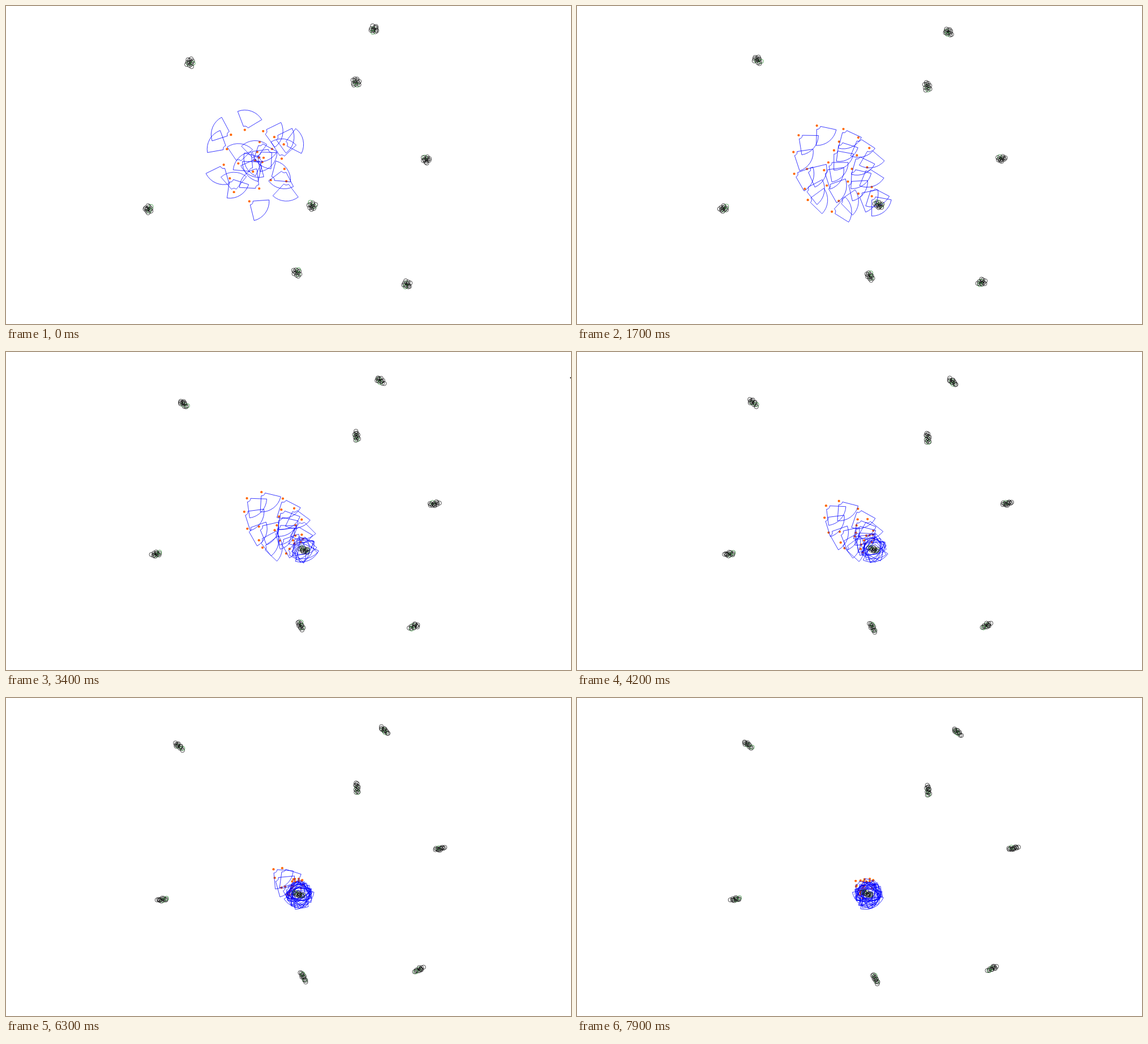
Recreate the animation shown at these times as an HTML page. Size 998 px wide and 561 px high, loop 8000 ms.

```html
<!DOCTYPE html>
<html lang="en">
<head>
<meta charset="utf-8">
<title>Foraging swarm</title>
<style>
  html, body { margin: 0; width: 100%; height: 100%; overflow: hidden; background: #fff; }
  svg { display: block; width: 998px; height: 561px; }
  .view { fill: none; stroke: #00f; stroke-width: .7; }
  .agent { fill: #f60; }
  .cell { fill: none; stroke: #000; stroke-width: .7; }
  .sprout { stroke: #17801f; }
</style>
</head>
<body>
<svg id="stage" viewBox="0 0 998 561" xmlns="http://www.w3.org/2000/svg"></svg>
<script>
const STEP = 100, STEPS = 80;
const FOUND = 8, TURN = 10, GATHER = 17;
const VIEW = { near: 6.5, far: 35, half: 40 };
const CELLS = 13, GOLDEN = 137.5;
const NEST = [448, 268];

// x, y, heading of each agent at the moment food is found
const flock = [
  [412,200,-101], [381,214,172], [370,247,180], [364,284,84], [390,283,-114], [422,283,-124],
  [428,258,86], [436,238,12], [448,219,39], [457,200,-16], [486,214,-16], [509,234,-43],
  [487,240,103], [508,270,-113], [476,267,124], [464,293,112], [511,296,73], [511,323,63],
  [477,326,-65], [427,311,-165], [378,316,28], [390,345,-121], [447,343,-167], [425,365,6]];

// x, y, drift direction of each food cluster
const food = [
  [325,100,-143], [650,41,41], [618,134,86], [742,271,-12],
  [541,353,-165], [251,358,-6], [514,470,63], [708,491,-29]];
const goal = food[4];

const RAD = Math.PI / 180;
const lerp = (a, b, k) => a + (b - a) * k;
const clamp = k => Math.min(1, Math.max(0, k));
const polar = (r, deg) => [r * Math.cos(deg * RAD), r * Math.sin(deg * RAD)];
const bearing = ([x0, y0], [x1, y1]) => Math.atan2(y1 - y0, x1 - x0) / RAD;
const move = ([x, y], r, deg) => [x + r * Math.cos(deg * RAD), y + r * Math.sin(deg * RAD)];
const turn = (a, b, k) => a + ((((b - a) % 360) + 540) % 360 - 180) * k;
const noise = n => { const v = Math.sin(n * 127.1 + 11.7) * 43758.5453; return v - Math.floor(v); };

function center([x, y, direction], t) {
  const p = t / (STEPS - 1);
  return move([x, y], 29 * p * (1.3 - .3 * p), direction);
}

// Spread out from the nest, then turn to the food, slow down and stop around it.
function journey([x, y, heading], i) {
  const standoff = 18 + 12 * noise(i);
  const found = [x, y], outward = bearing(NEST, found);
  const poses = [];
  let pos = found;
  for (let t = 0; t < STEPS; t++) {
    if (t <= FOUND) {
      const left = 1 - t / FOUND;
      poses.push({ pos: move(found, -21 * left, outward), angle: heading + 30 * left });
      continue;
    }
    const target = center(goal, t);
    if (t <= TURN) pos = move(pos, 2.5, heading);
    else {
      const gap = Math.hypot(target[0] - pos[0], target[1] - pos[1]) - standoff;
      const speed = 2.85 - .0196 * (t - GATHER);
      pos = move(pos, Math.max(0, Math.min(speed, gap)), bearing(pos, target));
    }
    poses.push({ pos, angle: turn(heading, bearing(pos, target), clamp((t - FOUND - 1) / 2)) });
  }
  return poses;
}

// Cells fill a disc that is drawn out along the drift direction.
function cellAt(cluster, c, i, t) {
  const seed = c * 41 + i * 3 + 1, stretch = clamp(t / 50);
  const [dx, dy] = polar(6.8 * Math.sqrt((i + noise(seed)) / CELLS), i * GOLDEN + c * 50);
  const sway = n => .8 * Math.sin(t * .3 + noise(n) * 9);
  const u = dx * lerp(1, 1.5, stretch) + sway(seed);
  const v = dy * lerp(1, .4, stretch) + sway(seed + 1) * .6;
  return move(move(center(cluster, t), u, cluster[2]), v, cluster[2] + 90);
}

const stage = document.getElementById('stage');
function set(el, attrs) {
  for (const name in attrs) el.setAttribute(name, attrs[name]);
}
function add(tag, attrs) {
  const el = document.createElementNS('http://www.w3.org/2000/svg', tag);
  set(el, attrs);
  return stage.appendChild(el);
}
const show = (el, on) => set(el, { visibility: on ? 'visible' : 'hidden' });

const { near, far, half } = VIEW;
const corner = (r, deg) => polar(r, deg).map(n => n.toFixed(2)).join(' ');
const fan = `M${corner(near, -half)}L${corner(far, -half)}A${far} ${far} 0 0 1 ${corner(far, half)}` +
  `L${corner(near, half)}A${near} ${near} 0 0 0 ${corner(near, -half)}`;

const journeys = flock.map(journey);
const dots = flock.map(() => add('circle', { class: 'agent', r: 2.1 }));
const fans = flock.map(() => add('path', { class: 'view', d: fan }));
const spotted = add('circle', { class: 'cell', cx: 531, cy: 349, r: 3.7, style: 'fill: #ffe600' });
const cells = food.map((_, c) => Array.from({ length: CELLS }, (_, i) =>
  add('circle', { class: (i + c) % 7 === 2 ? 'cell sprout' : 'cell', r: 3.7 })));
const pointer = add('path', { d: 'M996 45.5L998 44V47Z' });

function draw(t) {
  journeys.forEach((poses, i) => {
    const { pos: [x, y], angle } = poses[t];
    set(dots[i], { cx: x, cy: y });
    set(fans[i], { transform: `translate(${x} ${y}) rotate(${angle})` });
  });
  cells.forEach((group, c) => group.forEach((cell, i) => {
    const [cx, cy] = cellAt(food[c], c, i, t);
    set(cell, { cx, cy });
  }));
  show(spotted, t >= FOUND && t < TURN);
  show(pointer, t > GATHER && t < 35);
}

let origin;
function tick(now) {
  origin ??= now;
  draw(Math.floor((now - origin) / STEP) % STEPS);
  requestAnimationFrame(tick);
}
draw(0);
requestAnimationFrame(tick);
</script>
</body>
</html>
```
